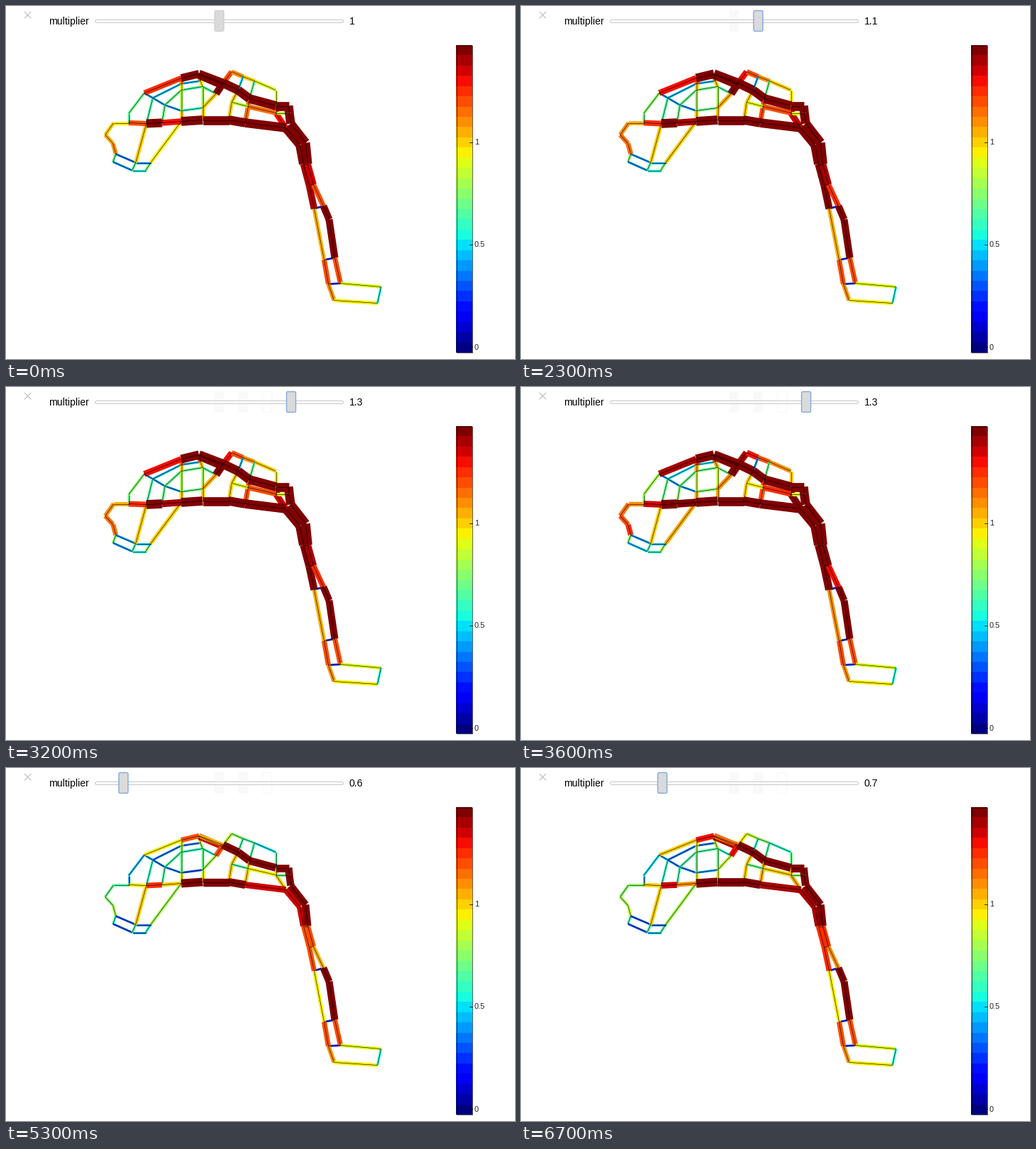
A matplotlib script for the animation above (8 s loop, 716 by 497 pixels).

```python
import numpy as np
import matplotlib.pyplot as plt
from matplotlib.animation import FuncAnimation
from matplotlib.collections import LineCollection
from matplotlib.patches import FancyBboxPatch, Rectangle

WIDTH, HEIGHT, DPI = 716, 497, 100
STEP_MS, LOOP_MS = 100, 8000
PX = 72 / DPI
BANDS = 30
LOW, HIGH = 0.6, 1.3
CMAP = plt.get_cmap("jet", BANDS)
BLUE, GREY, FILL = "#84a9e4", "#d2d2d2", "#dadada"

segments, bases, growths = [], [], []


def chain(points, first, last, growth=0):
    """Join points by pipes whose level at LOW ramps from first to last.

    Every level rises by growth when the multiplier goes from LOW to HIGH.
    """
    pairs = list(zip(points, points[1:]))
    segments.extend(pairs)
    bases.extend(np.linspace(first, last, len(pairs)))
    growths.extend([growth] * len(pairs))


# Rails shared by several parts of the network
belly = [(172, 164), (197, 165), (219, 164), (246, 162), (276, 160),
         (313, 160), (336, 164), (393, 171)]
outer = [(194, 122), (246, 101), (271, 95)]
inner = [(206, 129), (246, 109), (273, 105)]
middle = [(223, 139), (246, 118), (276, 113)]
lower = [(223, 139), (246, 147), (276, 143)]
roof = [(317, 92), (333, 99), (349, 105), (379, 118)]
spine = [(305, 108), (326, 118), (342, 130), (379, 140)]
floor = [(317, 135), (340, 141), (379, 150)]
left_leg = [(418, 222), (426, 252), (433, 285), (447, 357), (453, 391)]
right_leg = [(424, 222), (432, 251), (446, 281), (462, 354), (470, 390)]
throat, chin, lip, jaw = (182, 220), (154, 208), (177, 231), (203, 220)
elbow, toe = (295, 123), (522, 418)

# Snout
chain([belly[0], (151, 164), (139, 181), (150, 193), chin], 13, 15.5, 11)
chain([chin, (150, 219)], 12, 12, 4)
chain([(150, 219), lip], 6, 6, 3.5)
chain([lip, (196, 231), jaw], 8, 12, 4.5)
chain([jaw, throat, chin], 7, 6, 2.5)
chain([lip, throat, belly[1]], 13, 20)
chain([jaw, belly[3]], 15.5, 15.5, 6.5)

# Left vault
chain([belly[0], (172, 151), outer[0]], 8, 9, 8)
chain([outer[0], inner[0], middle[0], lower[1]], 7.5, 7, 1)
chain([belly[1], inner[0]], 12, 12, 2)
chain(inner, 7, 7, 3)
chain([belly[2], *middle, elbow], 13, 12, 2)
chain(lower[1:], 6.5, 6.5, 10)
for i in (1, 2):
    chain([outer[i], inner[i], middle[i]], 18, 15, 7)
    chain([middle[i], lower[i], belly[i + 2]], 14, 18, 3)

# Right box
chain([spine[0], *roof], 17, 10.5, 13)
for i in (1, 2, 3):
    chain([roof[i], spine[i]], 13, 13, 7 * i - 13)
    chain([spine[i], floor[i - 1], belly[i + 4]], 20, 20, 5 * (i - 1))
chain(floor, 13, 19, 7.5)
chain([floor[2], (397, 150)], 14, 14, 5)

# Rungs of the leg
for i, rung in enumerate(zip(left_leg, right_leg)):
    chain(rung, *((15, 15) if i < 2 else (5, 5)))

# Mains
chain(outer, 19, 24, 10.5)
chain([(271, 96), (304, 110)], 27, 27, 9)
chain([outer[2], spine[0]], 21, 21, 17)
chain([lower[2], elbow, spine[0]], 16, 24.5, 7.5)
chain(belly[:2], 19, 19, 9)
chain(belly[1:4], 25, 20, 11)
chain(belly[3:7], 31, 30, 3.5)
chain([*belly[6:], (413, 195), left_leg[0]], 27, 27, 9)
chain([*spine, (397, 140), (398, 150), (400, 165), (421, 192), right_leg[0]], 30, 28.6, 5)

# Leg
chain(left_leg[:3], 24, 24, 7)
chain(left_leg[2:4], 19, 19, 3)
chain([*left_leg[3:], (461, 414), toe], 24, 19)
chain(right_leg[:3], 24, 21, 5.5)
chain([right_leg[2], (454, 300), right_leg[3]], 28.6, 28.6)
chain([*right_leg[3:], (527, 395), toe], 24, 11)

segments = np.array(segments) + 0.5
bases, growths = np.array(bases), np.array(growths)

# (start ms, multiplier) for the drawing, which lags behind the slider
NETWORK = [(0, 1.0), (2300, 1.1), (3600, 1.2), (4600, 1.3), (5300, 0.6), (6700, 0.7)]
# (start ms, multiplier) for the slider
SLIDER = [(0, 1.0), (1500, 1.1), (2500, 1.2), (2700, 1.3), (4200, 0.6), (5900, 0.7)]
# (press ms, release ms) while the handle is white
PRESSES = [(1300, 1800), (2400, 2900), (3000, 3200), (4200, 4400)]
# (start ms, multiplier, fill, border) of the faint traces left by the handle
TRACES = [(1500, 1.0, "#f9f9f9", "#f9f9f9"), (2500, 1.1, "#f9f9f9", "#f9f9f9"),
          (2700, 1.2, "white", "#f5f5f5")]


def current(schedule, time):
    return [value for start, value in schedule if start <= time][-1]


def handle_left(value):
    return 300 + 337 * (value - 1) - 6.5


def rounded(x, y, w, h, radius, **style):
    return ax.add_patch(FancyBboxPatch(
        (x, y), w, h, boxstyle=f"round,pad=0,rounding_size={radius}", **style))


def handle_box(value, **style):
    return rounded(handle_left(value), 6.5, 13, 29, 2, **style)


def label(x, y, text, size, **style):
    return ax.text(x, y, text, fontsize=size * PX, family="Liberation Sans", **style)


fig = plt.figure(figsize=(WIDTH / DPI, HEIGHT / DPI), dpi=DPI, facecolor="white")
ax = fig.add_axes((0, 0, 1, 1))
ax.axis("off")

# Colour bar
ax.imshow(np.arange(BANDS)[:, None], extent=(633, 656, 488, 55), origin="lower",
          cmap=CMAP, aspect="auto", interpolation="nearest")
ax.add_patch(Rectangle((633.5, 55.5), 22, 432, fill=False, ec="black", lw=0.6 * PX))
for value in (0, 0.5, 1):
    y = 480 - 288.5 * value
    ax.plot((652, 656), (y, y), color="black", lw=0.8 * PX)
    label(659, y + 3.5, f"{value:g}", 11, color="#222222")
ax.set_xlim(0, WIDTH)
ax.set_ylim(HEIGHT, 0)

# Control row
for ends in ((8.5, 17), (17, 8.5)):
    ax.plot((26.3, 34.8), ends, color="#c4c4c4", lw=1.3 * PX)
label(60.2, 26, "multiplier", 14)
readout = label(482.5, 26, "1", 14)
traces = [handle_box(value, fc=fill, ec=edge, lw=PX, zorder=1)
          for _, value, fill, edge in TRACES]
rounded(125.5, 19.5, 349, 4, 2, fc="white", ec="#c8c8c8", lw=PX, zorder=2)
handle = handle_box(1, lw=1.4 * PX, zorder=3)

# Pipes with their centre lines
pipes = ax.add_collection(LineCollection(segments, capstyle="butt", zorder=4), autolim=False)
ax.add_collection(LineCollection(segments, colors="black", linewidths=0.6 * PX, zorder=5),
                  autolim=False)


def update(frame):
    time = frame * STEP_MS
    share = (current(NETWORK, time) - LOW) / (HIGH - LOW)
    levels = bases + growths * share
    pipes.set_color(CMAP(np.clip(np.rint(levels), 0, BANDS - 1).astype(int)))
    pipes.set_linewidth((2.8 + 7.5 * (np.minimum(levels, 32) / 29) ** 2.8) * PX)

    value = current(SLIDER, time)
    pressed = any(start <= time < end for start, end in PRESSES)
    handle.set_x(handle_left(value))
    handle.set_facecolor("white" if pressed else FILL)
    handle.set_edgecolor(BLUE if time >= PRESSES[0][0] else GREY)
    readout.set_text(f"{value:g}")
    for trace, (start, *_) in zip(traces, TRACES):
        trace.set_visible(time >= start)
    return pipes, handle, readout, *traces


animation = FuncAnimation(fig, update, frames=LOOP_MS // STEP_MS, interval=STEP_MS,
                          repeat=True, repeat_delay=0, blit=False)
plt.show()
```
